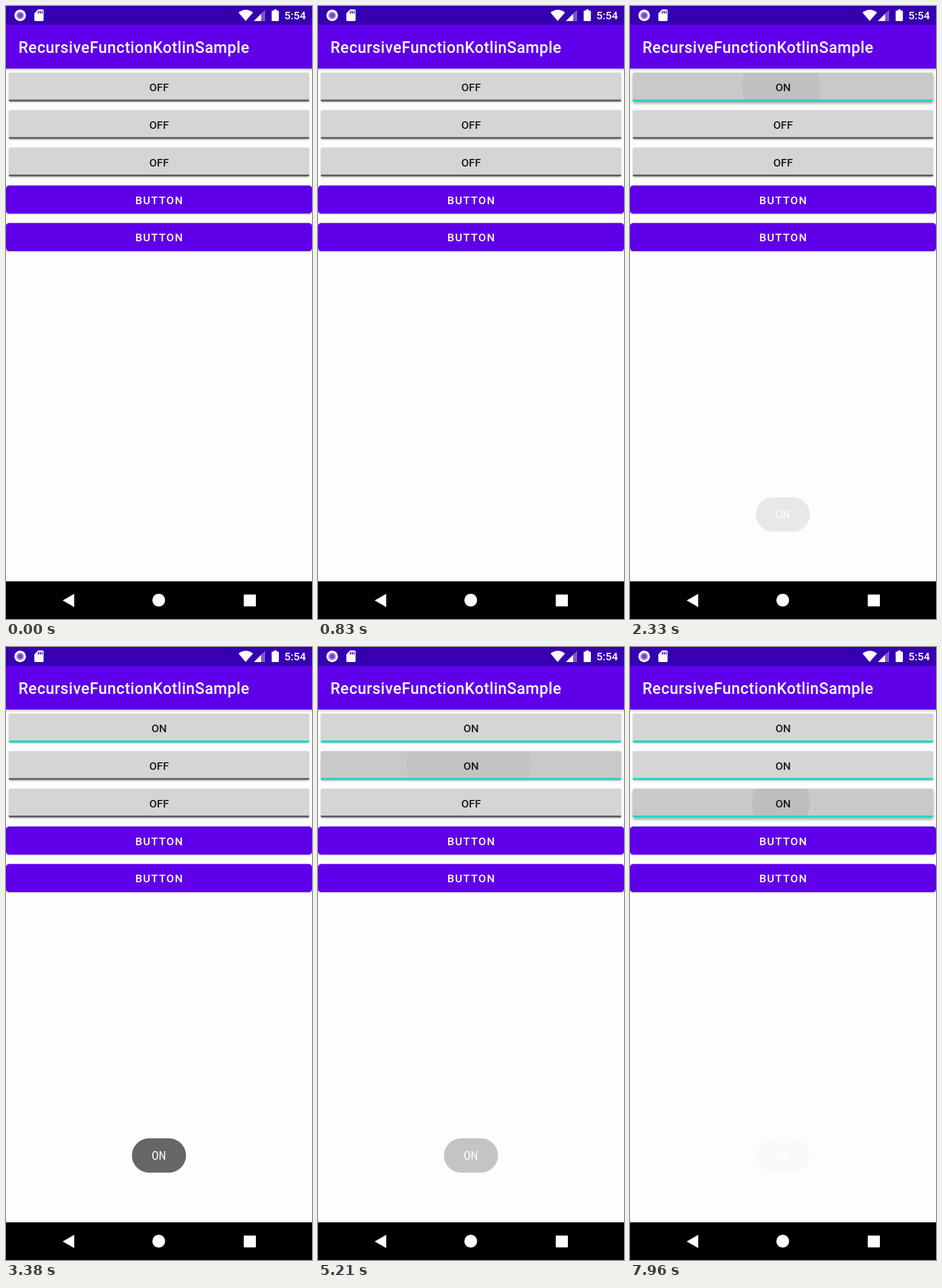
Write an HTML page that moves like this. It is 529 by 1058 pixels and loops after 8 s.

```html
<!DOCTYPE html>
<html lang="en">
<head>
<meta charset="utf-8">
<title>RecursiveFunctionKotlinSample</title>
<style>
  html, body { margin: 0; width: 100%; height: 100%; overflow: hidden; background: #fdfdfd; }
  svg { display: block; width: 100%; height: 100%; }
  text { font-family: Roboto, sans-serif; font-weight: 500; font-size: 18.86px; fill: #fff; }
  .title { font-size: 26.94px; letter-spacing: .55px; }
  .mid { text-anchor: middle; }
  .state { fill: #1b1b1b; }
  .caption { letter-spacing: 1.68px; }
  .toast { font-family: "Roboto Condensed", Roboto, sans-serif; font-stretch: 75%; font-weight: 400; font-size: 20.5px; }
  .raised { filter: drop-shadow(0 1.4px 1.2px rgba(0, 0, 0, .3)); }
</style>
</head>
<body>
<svg id="stage" viewBox="0 0 529 1058">
  <defs>
    <linearGradient id="barShadow" x2="0" y2="1">
      <stop stop-opacity=".24"/>
      <stop offset="1" stop-opacity="0"/>
    </linearGradient>
    <clipPath id="face"><rect x="5" y="0" width="519" height="50" rx="2.5"/></clipPath>
  </defs>

  <rect width="529" height="1058" fill="#fdfdfd"/>
  <rect y="107" width="529" height="6" fill="url(#barShadow)"/>
  <rect y="32" width="529" height="76" fill="#6000ea"/>
  <rect width="529" height="32.5" fill="#3600b1"/>
  <text class="title" x="21.5" y="81">RecursiveFunctionKotlinSample</text>

  <g fill="#fff">
    <circle cx="24.5" cy="16.3" r="10"/>
    <circle cx="24.5" cy="16.3" r="6.6" fill="#a68ddd"/>
    <circle cx="24.5" cy="16.3" r="4" fill="#7049c6"/>
    <path d="M55.5 6H63q2 0 2 2v16q0 2-2 2H51q-2 0-2-2V12.5z"/>
    <path d="M56 8.5v4.5M59.2 8.5v4.5M62.4 8.5v4.5" stroke="#3600b1" stroke-width="1.7"/>
    <path d="M414.3 26 402 11.2Q414.5 2 427 11.2z"/>
    <path d="M448 6.5V26H428.5z" opacity=".35"/>
    <path d="M441 13.5V26H428.5z"/>
    <path d="M463 6h5v2h2.5q1.2 0 1.2 1.2v15.6q0 1.2-1.2 1.2h-10q-1.2 0-1.2-1.2V9.2q0-1.2 1.2-1.2H463z"/>
    <text x="481.2" y="23.3">5:54</text>
  </g>

  <g id="toggles"></g>
  <g id="buttons"></g>

  <g id="toast" opacity="0">
    <rect x="217.7" y="848" width="93.5" height="59.3" rx="29.65" fill="#666"/>
    <text class="toast mid" x="264.3" y="885.3">ON</text>
  </g>

  <rect y="993" width="529" height="65" fill="#000"/>
  <g fill="#fff">
    <path d="M98 1026 118 1014.5v23z"/>
    <circle cx="264" cy="1025.5" r="11"/>
    <rect x="411" y="1015.7" width="21" height="20.6" rx="1"/>
  </g>
</svg>
<script>
const LOOP = 8000;
const TOGGLE_DELAY = 70, TOAST_DELAY = 77, TOAST_HOLD = 1960, TOAST_FADE = 500;
const presses = [2220, 5030, 7880];

const clamp = v => Math.min(1, Math.max(0, v));
const byId = id => document.getElementById(id);

byId('toggles').innerHTML = presses.map((_, i) => `
  <g transform="translate(0 ${115 + i * 64.7})">
    <g class="raised"><rect x="5" width="519" height="50" rx="2.5" fill="#d5d5d5"/></g>
    <g clip-path="url(#face)">
      <rect class="tint" x="5" width="519" height="50" opacity="0"/>
      <circle class="ripple" cx="261" cy="24" r="0" opacity="0"/>
      <rect class="line" x="5" y="46.5" width="519" height="3.3"/>
    </g>
    <text class="state mid" x="264.7" y="32.4"></text>
  </g>`).join('');

byId('buttons').innerHTML = [309.7, 374.4].map(y => `
  <g class="raised"><rect y="${y}" width="529" height="48.6" rx="5.4" fill="#6000ea"/></g>
  <text class="caption mid" x="265.3" y="${y + 32}">BUTTON</text>`).join('');

const toggles = [...byId('toggles').children].map(g => {
  const part = name => g.querySelector('.' + name);
  return { body: part('raised'), tint: part('tint'), ripple: part('ripple'), line: part('line'), label: part('state') };
});

function drawToggle(ui, age) {
  const on = age >= TOGGLE_DELAY;
  const pressed = age >= 0 && age < 420;
  ui.label.textContent = on ? 'ON' : 'OFF';
  ui.line.setAttribute('fill', on ? '#0bd8c4' : '#5f5f5f');
  ui.ripple.setAttribute('r', pressed ? Math.min(264, 4 + age * .573) : 0);
  ui.ripple.setAttribute('opacity', pressed ? .055 * clamp((330 - age) / 250) : 0);
  ui.tint.setAttribute('opacity', pressed ? .055 * clamp(age / 75) * clamp((420 - age) / 200) : 0);
  const lift = pressed ? clamp(age / 80) * clamp((220 - age) / 120) : 0;
  ui.body.style.filter = lift
    ? `drop-shadow(0 ${1.4 + lift * 1.8}px ${1.2 + lift * 1.6}px rgba(0,0,0,${.3 + lift * .08}))`
    : '';
}

function toastAlpha(age) {
  if (age < 0) return 0;
  const enter = 1 - (1 - clamp(age / TOAST_FADE)) ** 2;
  const leave = 1 - clamp((age - TOAST_HOLD) / TOAST_FADE) ** 2;
  return Math.min(enter, leave);
}

function draw(now) {
  const t = now % LOOP;
  toggles.forEach((ui, i) => drawToggle(ui, t - presses[i]));
  const alpha = Math.max(...presses.map(p => toastAlpha(t - p - TOAST_DELAY)));
  byId('toast').setAttribute('opacity', alpha);
}

const start = performance.now();
function tick() {
  draw(performance.now() - start);
  requestAnimationFrame(tick);
}
tick();
</script>
</body>
</html>
```
